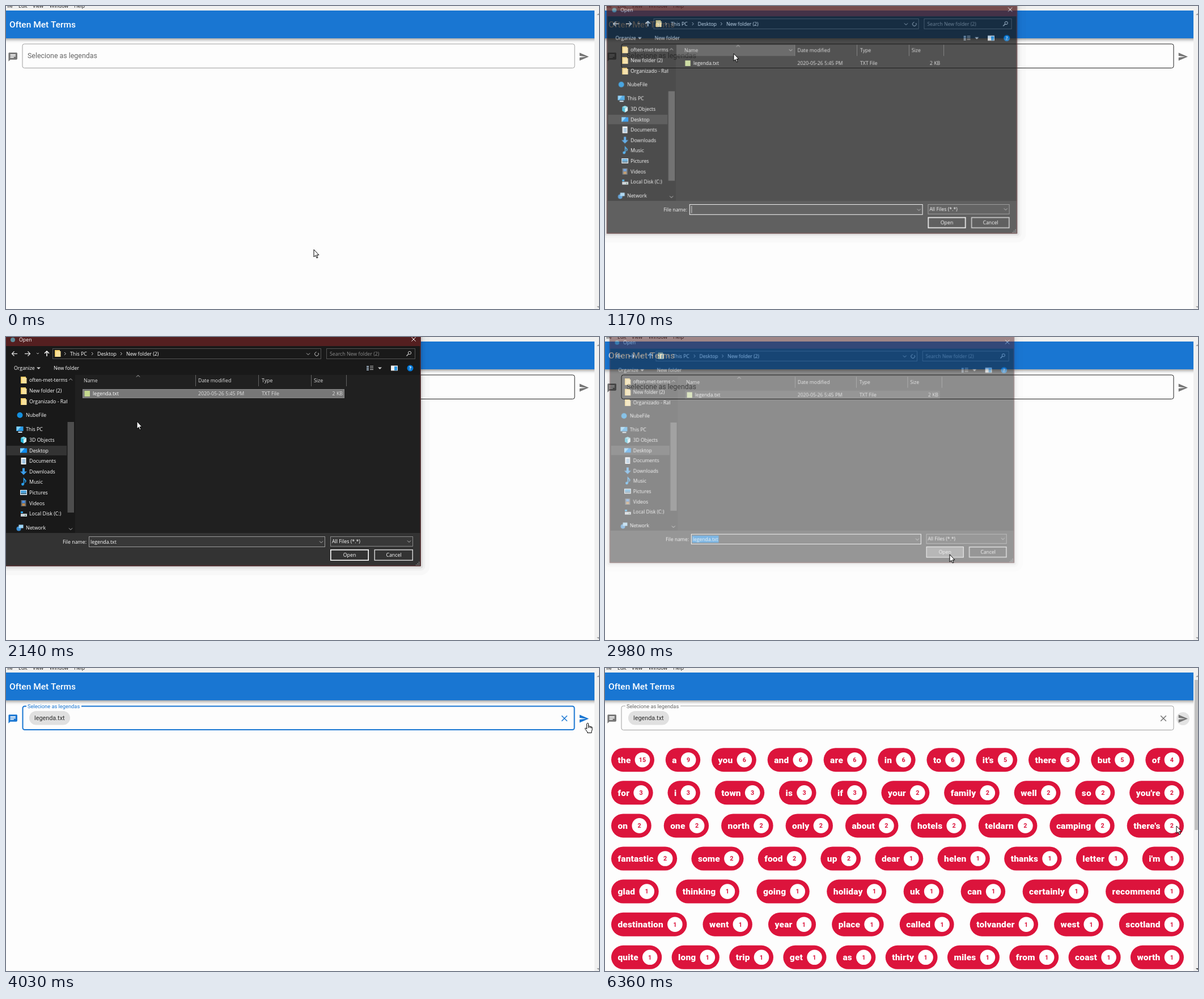
Write an HTML page with a canvas that moves like this. It is 1046 px wide and 535 px high and loops after 6.49 s.

```html
<!DOCTYPE html>
<html lang="en">
<head>
<meta charset="utf-8">
<title>Often Met Terms</title>
<style>
html, body { margin: 0; width: 100%; height: 100%; overflow: hidden; background: #fdfdfd; }
canvas { display: block; }
</style>
</head>
<body>
<canvas id="stage" width="1046" height="535"></canvas>
<script>
const LOOP = 6490, BLUE = '#1976d2', GREY = '#757575', RED = '#dc143c', PAGE = '#fdfdfd';
const UI = '"Open Sans", "Noto Sans", sans-serif', ROBOTO = 'Roboto, sans-serif';
const stage = document.getElementById('stage').getContext('2d');

// The dialog is composed on its own layer so it can fade and scale as a whole.
const PAD_X = 10, PAD_Y = 20;
const layer = document.createElement('canvas');
layer.width = 760;
layer.height = 440;
const dlg = layer.getContext('2d');
let c = stage;

const ROWS = [
  'the 15,a 9,you 6,and 6,are 6,in 6,to 6,it\'s 5,there 5,but 5,of 4',
  'for 3,i 3,town 3,is 3,if 3,your 2,family 2,well 2,so 2,you\'re 2',
  'on 2,one 2,north 2,only 2,about 2,hotels 2,teldarn 2,camping 2,there\'s 2',
  'fantastic 2,some 2,food 2,up 2,dear 1,helen 1,thanks 1,letter 1,i\'m 1',
  'glad 1,thinking 1,going 1,holiday 1,uk 1,can 1,certainly 1,recommend 1',
  'destination 1,went 1,year 1,place 1,called 1,tolvander 1,west 1,scotland 1',
  'quite 1,long 1,trip 1,get 1,as 1,thirty 1,miles 1,from 1,coast 1,worth 1'
].map(r => r.split(',').map(p => p.split(' ')));

const CHAT = new Path2D('M20 2H4c-1.1 0-1.99.9-1.99 2L2 22l4-4h14c1.1 0 2-.9 2-2V4c0-1.1-.9-2-2-2zM6 9h12v2H6V9zm8 5H6v-2h8v2zm4-6H6V6h12v2z');
const SEND = new Path2D('M2 21l21-9L2 3v7l15 2-15 2z');
const ARROW = new Path2D('M0 0V13L3 10.4L5 15L7 14.2L5 9.7H9Z');
const HAND = new Path2D('M-1.5 1.2Q0-1 1.5 1.2V6Q3 4.8 4 6.4Q5.4 5.4 6.2 7Q7.6 6.4 8 8V12L6.8 15V17.5H-.5V16L-4.6 10.4Q-5 8.6-3 9.2L-1.5 10.6Z');
const KNUCKLES = new Path2D('M1.5 6V9M4 6.4V9M6.2 7V9.4');

// time, x, y of the pointer
const TRACK = [
  [180, 543, 430], [790, 227, 84], [1540, 227, 84], [1800, 221, 98], [1940, 222, 100],
  [2140, 231, 149], [2240, 236, 160], [2840, 608, 384], [3070, 608, 384], [3610, 920, 115],
  [4030, 1026, 97], [4240, 1024, 90], [5900, 1024, 90], [6360, 1008, 279]
];
const BEATS = [0, 200, 680, 2000, 4440, 4710, 5970, 6100, 6230, 6360];

const clamp = v => Math.max(0, Math.min(1, v));
const mix = (a, b, u) => a + (b - a) * u;
const smooth = u => u * u * (3 - 2 * u);

function snap(t) {
  const s = BEATS.filter(b => b <= t).pop();
  return s + 70 * Math.floor((t - s) / 70);
}

function pointerAt(t) {
  const i = TRACK.findIndex(k => k[0] > t);
  if (i === 0) return TRACK[0].slice(1);
  if (i < 0) return TRACK[TRACK.length - 1].slice(1);
  const a = TRACK[i - 1], b = TRACK[i], u = smooth((t - a[0]) / (b[0] - a[0]));
  return [mix(a[1], b[1], u), mix(a[2], b[2], u)];
}

function rect(x, y, x2, y2, color) {
  c.fillStyle = color;
  c.fillRect(x, y, x2 - x, y2 - y);
}

function box(x, y, x2, y2, color, w = 1) {
  c.strokeStyle = color;
  c.lineWidth = w;
  c.strokeRect(x + w / 2, y + w / 2, x2 - x - w, y2 - y - w);
}

function pill(x, y, w, h, r, color) {
  c.fillStyle = color;
  c.beginPath();
  c.roundRect(x, y, w, h, r);
  c.fill();
}

function disc(x, y, r, color) {
  c.fillStyle = color;
  c.beginPath();
  c.arc(x, y, r, 0, 7);
  c.fill();
}

function line(color, w, ...pts) {
  c.strokeStyle = color;
  c.lineWidth = w;
  c.beginPath();
  for (let i = 0; i < pts.length; i += 2) c.lineTo(pts[i], pts[i + 1]);
  c.stroke();
}

function poly(color, ...pts) {
  c.fillStyle = color;
  c.beginPath();
  for (let i = 0; i < pts.length; i += 2) c.lineTo(pts[i], pts[i + 1]);
  c.fill();
}

// y is the middle of the capitals
function text(s, x, y, size, color, font = ROBOTO, weight = 400, align = 'left') {
  c.font = `${weight} ${size}px ${font}`;
  c.textAlign = align;
  c.fillStyle = color;
  c.fillText(s, x, y + size * 0.355);
}
const label = (s, x, y, color = '#fff', align = 'left') => text(s, x, y, 8.8, color, UI, 400, align);

function chevron(x, y, dir, r = 3, color = '#b8b8b8') {
  line(color, 1, x - r, y - dir * r / 2, x, y + dir * r / 2, x + r, y - dir * r / 2);
}

function icon(path, x, y, color) {
  c.save();
  c.translate(x - 9.3, y - 9.3);
  c.scale(0.775, 0.775);
  c.fillStyle = color;
  c.fill(path, 'evenodd');
  c.restore();
}

function cross(x, y, r, color, w) {
  line(color, w, x - r, y - r, x + r, y + r);
  line(color, w, x + r, y - r, x - r, y + r);
}

function drawField(t) {
  const hover = t >= 620 && t < 3120, focus = t >= 3120 && t < 4440;
  const p = clamp((t - 3120) / 180);
  const tint = focus ? BLUE : GREY;
  const w = focus ? 2 : 1;
  c.strokeStyle = focus ? BLUE : hover ? '#212121' : '#9e9e9e';
  c.lineWidth = w;
  c.beginPath();
  c.roundRect(28.5 + w / 2, 66.5 + w / 2, 975 - w, 43.5 - w, 3.5);
  c.stroke();
  if (p > 0) rect(36, 65, 36 + 97 * p, 70, PAGE);
  text('Selecione as legendas', 38, mix(88, 67.5, p), mix(12.4, 9.3, p), focus ? BLUE : 'rgba(0,0,0,.6)');
  if (t >= 3190) {
    pill(41, 76, 72, 24.5, 12.25, '#e0e0e0');
    text('legenda.txt', 50, 88, 10.85, 'rgba(0,0,0,.8)');
    cross(985, 89, 4.8, tint, 1.5);
  }
  icon(CHAT, 12.2, 90, tint);
  if (t >= 4440) disc(1019.5, 89.5, mix(5, 11.5, clamp((t - 4380) / 200)), 'rgba(0,0,0,.1)');
  icon(SEND, 1019.5, 89.5, tint);
}

function drawWords() {
  ROWS.forEach((row, i) => {
    const y = 162.2 + 58.1 * i;
    c.letterSpacing = '0.15px';
    c.font = `900 15.5px ${ROBOTO}`;
    const widths = row.map(p => c.measureText(p[0]).width + 53);
    const gap = (1010 - widths.reduce((a, b) => a + b)) / (row.length - 1);
    let x = 11;
    row.forEach(([word, n], k) => {
      const right = x + widths[k];
      pill(x, y - 21, widths[k], 42, 21, RED);
      text(word, x + 11.5, y, 15.5, '#fff', ROBOTO, 900);
      disc(right - 21, y, 13.3, '#fff');
      text(n, right - 21, y, 10.8, RED, ROBOTO, 700, 'center');
      x = right + gap;
    });
    c.letterSpacing = '0px';
  });
}

function drawPage(t) {
  const full = t >= 4580;
  rect(0, 0, 1046, 535, PAGE);
  c.save();
  c.shadowColor = 'rgba(0,0,0,.45)';
  c.shadowBlur = 6;
  c.shadowOffsetY = 2;
  rect(-20, 8, 1060, 57, BLUE);
  c.restore();
  text('Often Met Terms', 6, 32.5, 15.5, '#fff', ROBOTO, 500);
  drawField(t);
  if (full) drawWords();
  rect(0, 0, 1046, 8, '#f0f0f0');
  [['File', -2], ['Edit', 22], ['View', 47], ['Window', 77], ['Help', 120]].forEach(m => label(m[0], m[1], 0, '#111'));
  rect(1038, 8, 1046, 535, '#f0f0f0');
  if (full) rect(1040, 21, 1046, 286, '#c1c1c1');
  poly('#a3a3a3', 1042, 16, 1045, 13, 1048, 16);
  poly(full ? '#505050' : '#a3a3a3', 1042, 530, 1045, 533, 1048, 530);
}

function folder(x, y) {
  rect(x, y - 6, x + 9, y + 6, '#f3cd68');
  rect(x + 2, y - 4, x + 10.5, y + 6, '#fbe19a');
}

function screen(x, y, color) {
  rect(x - 6, y - 5, x + 6, y + 3, color);
  poly('#7fd0ff', x - 6, y - 5, x + 2, y - 5, x - 5, y + 3, x - 6, y + 3);
}

const GLYPHS = {
  folder: (x, y) => folder(x - 5, y),
  cloud: (x, y) => disc(x, y, 5, '#1490df'),
  pc(x, y) {
    screen(x, y, '#2a9be6');
    rect(x - 3, y + 4, x + 4, y + 6, '#cfe6f5');
  },
  cube(x, y) {
    poly('#7fe0f5', x, y - 6, x + 5, y - 4, x, y - 1, x - 5, y - 4);
    poly('#25b4d8', x - 5, y - 4, x, y - 1, x, y + 6, x - 5, y + 3);
    poly('#d8f4fb', x + 5, y - 4, x, y - 1, x, y + 6, x + 5, y + 3);
  },
  desk: (x, y) => screen(x, y + 1, '#0d8bf0'),
  doc(x, y) {
    rect(x - 4.5, y - 6, x + 4.5, y + 6, '#f2f5f8');
    for (let k = -3; k <= 3; k += 2) rect(x - 2.5, y + k, x + 3, y + k + 1, '#4a90c8');
  },
  down: (x, y) => poly('#3a9be8', x - 2, y - 6, x + 2, y - 6, x + 2, y, x + 6, y, x, y + 6, x - 6, y, x - 2, y),
  note(x, y) {
    disc(x - 1.5, y + 4, 2.4, '#2aa0f0');
    line('#2aa0f0', 1.6, x + .5, y + 4, x + .5, y - 6, x + 4, y - 2, x + 3, y + 1);
  },
  pic(x, y) {
    rect(x - 6, y - 4.5, x + 6, y + 4.5, '#f2f5f8');
    rect(x - 5, y - 3.5, x + 5, y + 1, '#4ba3dd');
    rect(x - 5, y + 1, x + 5, y + 3, '#2d5f7c');
  },
  film(x, y) {
    rect(x - 4.5, y - 5.5, x + 4.5, y + 5.5, '#5d6670');
    rect(x - 2.5, y - 4.5, x + 2.5, y - .5, '#4d8ee0');
    rect(x - 2.5, y + .5, x + 2.5, y + 4.5, '#c08a4a');
  },
  disk(x, y) {
    rect(x - 5, y, x + 6, y + 5, '#c9d0d6');
    rect(x - 5, y - 4, x - 1, y - 1, '#29a3ea');
    rect(x + 2, y + 2, x + 4, y + 3.5, '#3c7e4d');
  },
  net(x, y) {
    disc(x - 2, y + 2, 4, '#3a8fd6');
    rect(x - 2, y - 5, x + 6, y + 1, '#9fd4f5');
  }
};

const SIDE = [
  ['folder', 'often-met-terms-list', 76], ['folder', 'New folder (2)', 95], ['folder', 'Organizado - Rafa', 114],
  ['cloud', 'NubeFile', 138, 1], ['pc', 'This PC', 163, 1], ['cube', '3D Objects', 182], ['desk', 'Desktop', 200.5],
  ['doc', 'Documents', 219], ['down', 'Downloads', 237.5], ['note', 'Music', 256], ['pic', 'Pictures', 274.5],
  ['film', 'Videos', 293.5], ['disk', 'Local Disk (C:)', 312], ['net', 'Network', 336.5, 1]
];

function drawBars() {
  disc(12, 5, 4, '#5d8c9a');
  label('Open', 23, 5);
  cross(719, 4, 3.6, '#fff', 1);
  // navigation
  line('#ddd', 1.3, 20, 29.5, 10.5, 29.5);
  line('#ddd', 1.3, 14.5, 25.5, 10.5, 29.5, 14.5, 33.5);
  line('#ddd', 1.3, 33, 29.5, 42.5, 29.5);
  line('#ddd', 1.3, 38.5, 25.5, 42.5, 29.5, 38.5, 33.5);
  chevron(56, 29, 1, 2);
  line('#fff', 1.5, 72, 34, 72, 25);
  line('#fff', 1.5, 68, 29, 72, 25, 76, 29);
  box(82, 20, 556, 39, '#535353');
  folder(86, 29);
  [[104], [152, 'This PC', 113], [203, 'Desktop', 161], [0, 'New folder (2)', 212]].forEach(([x, s, sx]) => {
    if (x) line('#ccc', 1, x - 1, 27, x + 1.5, 29.5, x - 1, 32);
    if (s) label(s, sx, 29.5);
  });
  chevron(533, 30, 1);
  c.strokeStyle = '#ccc';
  c.beginPath();
  c.arc(548, 30, 3.4, -.6, 4.6);
  c.stroke();
  box(565, 20, 722, 39, '#535353');
  label('Search New folder (2)', 571, 29.5, '#8c8c8c');
  c.strokeStyle = '#ccc';
  c.beginPath();
  c.arc(712, 28, 2.6, 0, 7);
  c.stroke();
  line('#ccc', 1.2, 710, 30, 706.5, 33.5);
  // tools
  label('Organize', 14, 55);
  poly('#ccc', 54, 53.5, 61, 53.5, 57.5, 57);
  label('New folder', 84, 55);
  for (let k = 0; k < 3; k++) {
    rect(636, 51 + 3 * k, 640, 53 + 3 * k, '#9ab');
    rect(642, 51 + 3 * k, 648, 52 + 3 * k, '#ccc');
  }
  poly('#ccc', 656, 53.5, 663, 53.5, 659.5, 57);
  rect(679, 50.5, 691, 59.5, '#eee');
  rect(685, 52, 690, 59, '#2d96e0');
  disc(713, 55, 5.5, '#0078d7');
  text('?', 713, 55, 8.5, '#fff', UI, 700, 'center');
}

function drawSide() {
  rect(1, 192, 107, 209, '#333');
  c.save();
  c.beginPath();
  c.rect(0, 67, 108, 279);
  c.clip();
  SIDE.forEach(([kind, name, y, top]) => {
    GLYPHS[kind](top ? 24.5 : 31, y);
    label(name, top ? 35 : 41, y);
  });
  c.restore();
  rect(108.5, 150, 120, 310, '#4d4d4d');
  chevron(114, 75, -1);
  chevron(114, 339, 1);
}

function drawList(t) {
  const picked = t >= 1870;
  if (t < 1700) {
    rect(123, 67, 334, 87, '#434343');
    chevron(327, 76.5, 1);
  }
  chevron(233, 69, -1);
  [['Name', 137, 334], ['Date modified', 339, 445], ['Type', 451, 538], ['Size', 543, 600]].forEach(([s, x, edge]) => {
    label(s, x, 77, '#dedede');
    rect(edge, 67, edge + 1, 87, '#636363');
  });
  if (t >= 1700) {
    rect(135, 92, 597, 108, t >= 2900 ? '#333' : picked ? '#777' : '#4d4d4d');
    if (picked && t < 2900) box(135, 92, 597, 108, '#8a8a8a');
  }
  rect(138.5, 95, 148, 105, '#c5d98e');
  label('legenda.txt', 153, 100);
  label('2020-05-26 5:45 PM', 339, 100, '#dedede');
  label('TXT File', 451, 100, '#dedede');
  label('2 KB', 594, 100, '#dedede', 'right');
}

function drawFooter(t) {
  const picked = t >= 1870, closing = t >= 2900, over = t >= 2750;
  label('File name:', 142, 361.5, '#fff', 'right');
  rect(146, 352, 563, 371, '#383838');
  box(146, 352, 563, 371, picked && !closing ? '#9b9b9b' : '#fff');
  if (closing) rect(148, 355, 196, 368, '#0078d7');
  if (picked) label('legenda.txt', 149, 361.5);
  else if (t < 1520) rect(149.5, 355, 150.5, 368, '#ddd');
  chevron(556, 362, 1);
  rect(572, 352, 718, 370, '#383838');
  box(572, 352, 718, 370, '#8a8a8a');
  label('All Files (*.*)', 575, 361);
  chevron(711, 361, 1);
  rect(572, 375, 640, 395, closing ? '#7a7a7a' : over ? '#4f4f4f' : '#333');
  box(572, 375, 640, 395, '#fff', closing ? 1 : 1.6);
  label('Open', 606, 384.5, '#fff', 'center');
  box(649.5, 375, 718, 395, '#d0d0d0', 1.5);
  label('Cancel', 684, 384.5, '#fff', 'center');
  for (let i = 0; i < 3; i++)
    for (let j = 0; j <= i; j++) rect(728 - 2.5 * j, 397 + 2.5 * i, 729.3 - 2.5 * j, 398.3 + 2.5 * i, '#aaa');
}

function drawDialog(t) {
  const a = t < 2900 ? 1 - (1 - clamp((t - 1030) / 280)) ** 2 : clamp(0.47 - (t - 2980) * 0.0052);
  if (a <= 0 || t < 1030) return;
  c = dlg;
  c.setTransform(1, 0, 0, 1, 0, 0);
  c.clearRect(0, 0, layer.width, layer.height);
  c.translate(PAD_X, PAD_Y);
  rect(-1.5, -8, 731.5, 404.5, '#191919');
  rect(-1.5, -8, 731.5, 16, '#541f20');
  rect(122, 67, 731.5, 346, '#202020');
  rect(-1.5, 346, 731.5, 404.5, '#333');
  drawBars();
  drawSide();
  drawList(t);
  drawFooter(t);
  box(-1.5, -8, 731.5, 404.5, '#6b2c2e');

  c = stage;
  c.save();
  c.translate(365, 187);
  c.scale(0.95 + 0.05 * a, 0.95 + 0.05 * a);
  c.translate(-365, -187);
  c.globalAlpha = a;
  [[16, .018], [8, .03], [4, .07]].forEach(([d, k]) =>
    pill(-1.5 - d, -8 - d, 733 + 2 * d, 412.5 + 2 * d, d, `rgba(0,0,0,${k})`));
  c.drawImage(layer, -PAD_X, -PAD_Y);
  c.restore();
}

function drawPointer(t) {
  const [x, y] = pointerAt(t);
  const inField = x > 29 && x < 1003 && y > 67 && y < 110 && (t < 1100 || t > 3120);
  const onSend = x > 1008 && y > 77 && y < 103;
  const hand = inField || onSend;
  c.save();
  c.translate(x, y);
  c.fillStyle = '#fff';
  c.strokeStyle = '#000';
  c.lineWidth = 1;
  c.lineJoin = 'round';
  c.fill(hand ? HAND : ARROW);
  c.stroke(hand ? HAND : ARROW);
  if (hand) c.stroke(KNUCKLES);
  c.restore();
}

function frame(now) {
  const t = snap(now % LOOP);
  c = stage;
  drawPage(t);
  drawDialog(t);
  drawPointer(t);
}

const start = performance.now();
function tick() {
  frame(performance.now() - start);
  requestAnimationFrame(tick);
}
tick();
</script>
</body>
</html>
```
